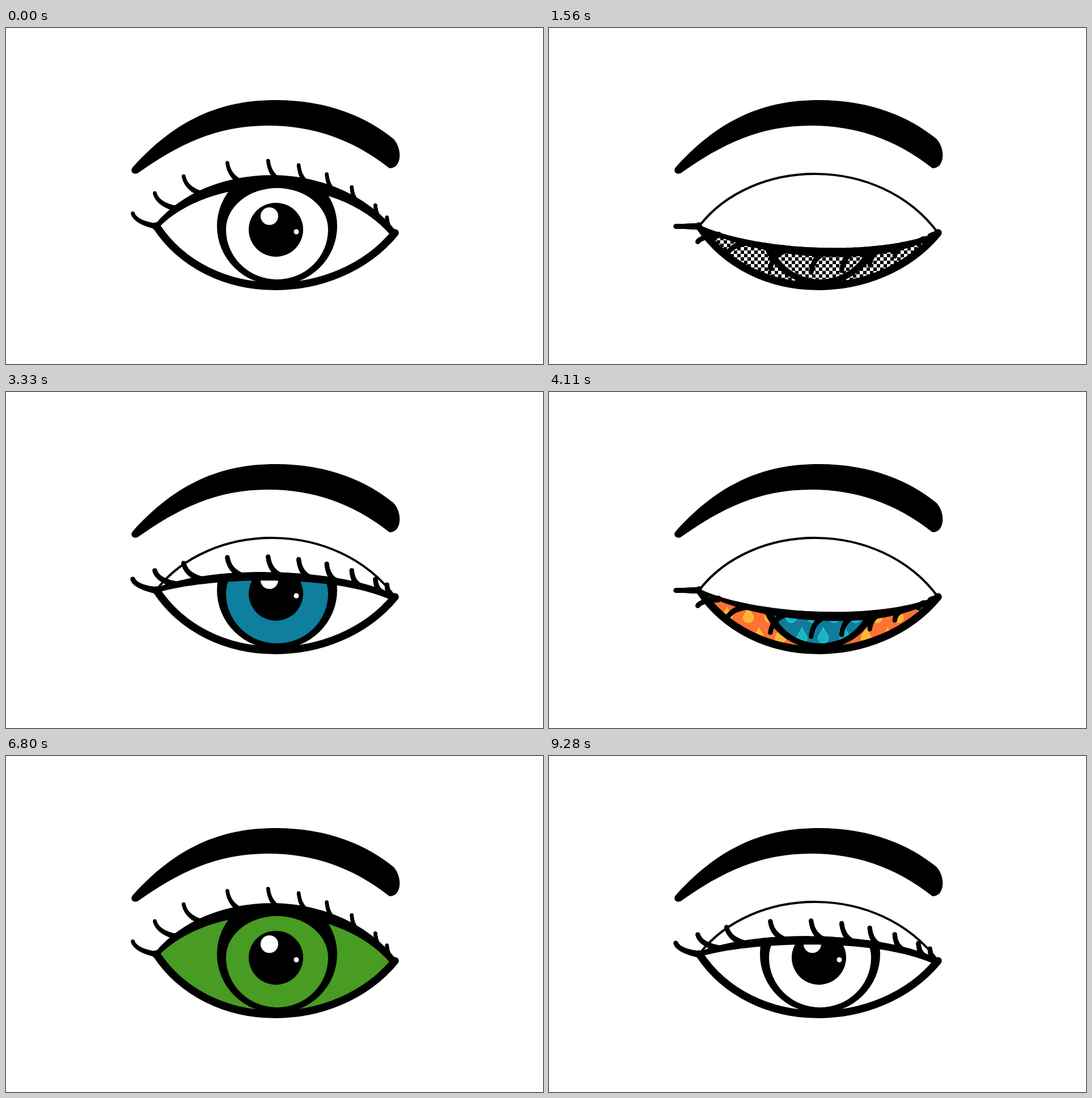
An HTML page with a canvas that plays this animation: 947x592 px, repeating every 9.35 s.

```html
<!DOCTYPE html>
<html lang="en">
<head>
<meta charset="utf-8">
<title>Blinking eye</title>
<style>
  html, body { margin: 0; width: 100%; height: 100%; overflow: hidden; background: #fff; }
  canvas { display: block; width: 947px; height: 592px; }
</style>
</head>
<body>
<canvas id="stage" width="947" height="592"></canvas>
<script>
const ctx = document.getElementById('stage').getContext('2d');
const CYCLE = 850, HOLD = 500, STEP = 70, INK = '#000';

const BROW = new Path2D('M223 246 C300 160 380 127 475 127 C570 127 637 158 683 195 ' +
  'C700 213 698 248 676 247 C610 195 540 172 462 172 C370 172 305 205 232 256 C225 259 218 253 223 246Z');

// Every lid edge runs corner to corner; two heights bend it.
const edge = (y1, y2, left = [265, 349], right = [686, 361]) =>
  [...left, 358, y1, 582, y2, ...right];
const lidTop = (y1, y2) => edge(y1, y2, [263, 346], [688, 358]);
const lidLow = (y1, y2) => edge(y1, y2, [268, 353], [680, 367]);

const LOWER = edge(490, 487);
const CREASE = edge(228, 221);
const BALL_TOP = edge(244, 238);

// Lashes reach rise + hang * sin(PI t) below the lid at t.
const POSES = {
  open: { top: lidTop(231, 226), low: lidLow(258, 251), rise: -23, hang: -14, tip: 3.2 },
  half: { top: lidTop(305, 307), low: lidLow(326, 320), rise: -20, hang: -15, tip: 4 },
  low: { top: lidTop(392, 405), low: lidLow(405, 428), rise: 0, hang: 36, tip: 4 },
  closed: { top: lidTop(474, 471), low: lidLow(500, 497), rise: 14, hang: 35, tip: 4 }
};
const BLINK = ['half', 'low', 'closed', 'low', 'half'];
const ROOTS = [0, 0.11, 0.23, 0.39, 0.53, 0.635, 0.735, 0.83, 0.93, 0.985];

const LOOKS = [
  { white: '#fff', iris: '#fff' },
  { white: '#fff', iris: '#333366' },
  { white: '#fff', iris: '#fff', extra: checker },
  { white: '#ffff33', iris: '#333366' },
  { white: '#fff', iris: '#0e7f9e' },
  { white: '#fd7235', iris: '#0e7d9c', extra: drops },
  { white: '#fff', iris: '#ff999b', extra: trees },
  { white: '#fff', iris: '#ff999b' },
  { white: '#489b23', iris: '#489b23' },
  { white: '#fff', iris: '#489b23' },
  { white: '#fff', iris: '#0e7f9e' }
];

function fill(color) {
  ctx.fillStyle = color;
  ctx.fill();
}

function dot(x, y, r, color) {
  ctx.beginPath();
  ctx.arc(x, y, r, 0, 7);
  fill(color);
}

// Ellipse with different heights above and below its centre.
function egg(x, y, rx, up, down) {
  ctx.beginPath();
  ctx.ellipse(x, y, rx, down, 0, 0, Math.PI);
  ctx.ellipse(x, y, rx, up, 0, Math.PI, 2 * Math.PI);
}

function trace(e) {
  ctx.moveTo(e[0], e[1]);
  ctx.bezierCurveTo(...e.slice(2));
}

function between(a, b) {
  ctx.beginPath();
  trace(a);
  ctx.lineTo(b[6], b[7]);
  ctx.bezierCurveTo(b[4], b[5], b[2], b[3], b[0], b[1]);
  ctx.closePath();
}

function line(e, width) {
  ctx.beginPath();
  trace(e);
  ctx.lineWidth = width;
  ctx.stroke();
}

function pointOn(e, t) {
  const s = 1 - t;
  return [0, 1].map(k => s * s * s * e[k] + 3 * s * s * t * e[2 + k] +
    3 * s * t * t * e[4 + k] + t * t * t * e[6 + k]);
}

function lash(pose, root) {
  const a = pointOn(pose.top, root), b = pointOn(pose.low, root);
  const x = (a[0] + b[0]) / 2, y = (a[1] + b[1]) / 2;
  const dx = 35 * root - 42, dy = pose.rise + pose.hang * Math.sin(Math.PI * root);
  for (let t = 0; t <= 1; t += 0.025) {
    const s = 1 - t;
    dot(x + dx * (s * s + 1.75 * s * t), y + dy * (s * s + 0.6 * s * t), pose.tip + 2 * t * t, INK);
  }
}

function checker() {
  ctx.fillStyle = INK;
  for (let y = 0; y < 34; y++)
    for (let x = 1 - y % 2; x < 72; x += 2) ctx.fillRect(260 + x * 6, 260 + y * 6, 6, 6);
}

function drops(inIris) {
  ctx.lineWidth = 1;
  ctx.strokeStyle = inIris ? '#45d5d6' : '#ffc544';
  for (let row = 0; row < 6; row++) {
    const y = 432 - row * 36;
    for (let x = 257 + (row % 2) * 19; x < 690; x += 37.8) {
      ctx.beginPath();
      ctx.moveTo(x, y - 17);
      ctx.bezierCurveTo(x + 3, y - 9, x + 9, y - 4, x + 9, y + 2);
      ctx.bezierCurveTo(x + 9, y + 13, x - 9, y + 13, x - 9, y + 2);
      ctx.bezierCurveTo(x - 9, y - 4, x - 3, y - 9, x, y - 17);
      fill(inIris ? '#17b5c6' : '#ffb637');
      ctx.stroke();
    }
  }
}

let seed;
function rand() {
  seed = (seed * 16807) % 2147483647;
  return seed / 2147483647;
}

function branch(x, y, angle, len, width, depth, leaf) {
  ctx.lineWidth = width;
  ctx.beginPath();
  ctx.moveTo(x, y);
  for (let i = 0; i < 2; i++) {
    const a = angle + (rand() - 0.5) * 1.2;
    x += Math.cos(a) * len / 2;
    y += Math.sin(a) * len / 2;
    ctx.lineTo(x, y);
  }
  ctx.stroke();
  if (depth) {
    for (const side of [-1, 1])
      branch(x, y, angle + side * (0.2 + rand() * 0.5), len * (0.6 + rand() * 0.3), width * 0.7, depth - 1, leaf);
  } else if (rand() < 0.1) dot(x, y, 1.8, leaf);
}

function trees(inIris) {
  seed = 4217;
  if (inIris) {
    for (let a = 0.25; a < 6.5; a += Math.PI / 5.5)
      branch(476 + 45 * Math.cos(a), 355 + 45 * Math.sin(a), a, 17, 3.6, 4, '#d2912c');
  } else {
    branch(390, 392, 3.3, 21, 4.5, 4, '#888');
    branch(390, 400, 2.6, 15, 4, 4, '#888');
    branch(580, 374, 0.1, 19, 2.8, 4, '#888');
  }
}

// Fills the current path and lays the pattern inside it.
function paint(look, inIris) {
  fill(inIris ? look.iris : look.white);
  if (!look.extra) return;
  ctx.save();
  ctx.clip();
  look.extra(inIris);
  ctx.restore();
}

function eyeball(look) {
  ctx.save();
  between(BALL_TOP, LOWER);
  ctx.clip();
  paint(look, false);
  egg(478, 349, 106, 103, 104);
  fill(INK);
  egg(478, 355, 90, 73, 88);
  paint(look, true);
  egg(476, 355, 48, 47, 48);
  fill(INK);
  dot(464.5, 331.5, 15.5, '#fff');
  dot(512, 359, 4.5, '#fff');
  ctx.restore();
}

function draw(name, look) {
  const pose = POSES[name];
  ctx.fillStyle = '#fff';
  ctx.fillRect(0, 0, 947, 592);
  ctx.strokeStyle = INK;
  ctx.lineCap = ctx.lineJoin = 'round';

  ctx.fillStyle = INK;
  ctx.fill(BROW);
  eyeball(look);
  line(LOWER, 13.5);
  if (name !== 'open') {
    between(CREASE, pose.top);
    fill('#fff');
    line(CREASE, 4);
  }
  between(pose.top, pose.low);
  fill(INK);
  for (const root of ROOTS) lash(pose, root);
  dot(264, 350, 6, INK);
  dot(684, 361, 5.5, INK);
}

let shown = '';
function tick() {
  const t = performance.now() % (CYCLE * LOOKS.length);
  const u = t % CYCLE;
  const step = Math.floor((u - HOLD) / STEP);
  const pose = u < HOLD ? 'open' : BLINK[step];
  // The eye changes its look while shut.
  const index = (Math.floor(t / CYCLE) + (step >= 2 ? 1 : 0)) % LOOKS.length;
  const key = pose + index;
  if (key !== shown) {
    draw(pose, LOOKS[index]);
    shown = key;
  }
  requestAnimationFrame(tick);
}
tick();
</script>
</body>
</html>
```
